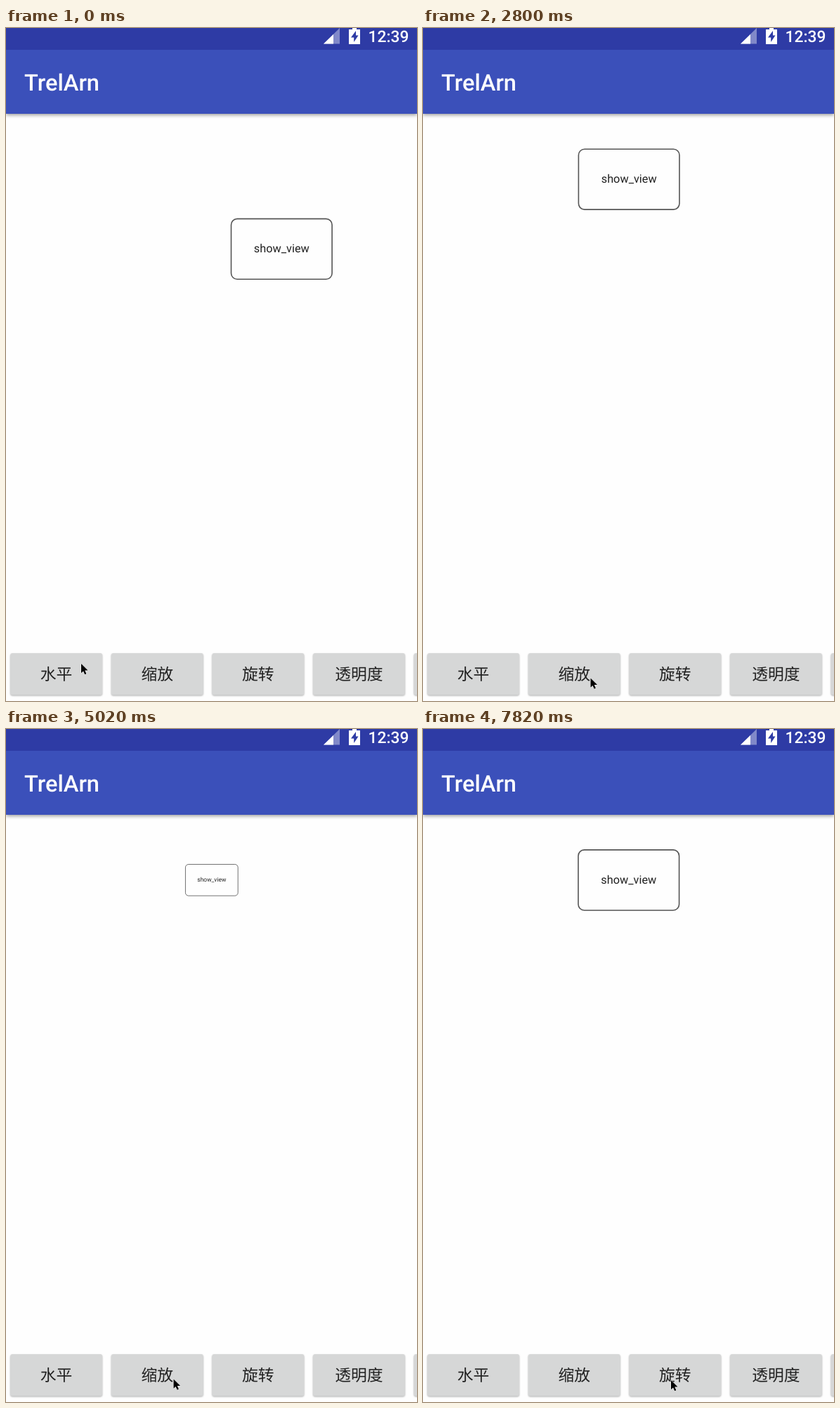
An HTML page that plays this animation: 585 px wide and 957 px high, repeating every 8 s.

```html
<!DOCTYPE html>
<html lang="zh">
<head>
<meta charset="utf-8">
<style>
  html, body { margin: 0; width: 100%; height: 100%; overflow: hidden; background: #fefefe; }
  svg { display: block; width: 585px; height: 957px; font-family: Roboto, sans-serif; text-rendering: geometricPrecision; }
  .bar { filter: drop-shadow(0 2px 2.5px rgba(0, 0, 0, .38)); }
  .label { font: 22.8px "Noto Sans CJK SC", "Noto Sans CJK", sans-serif; text-anchor: middle; fill: #212121; }
</style>
</head>
<body>
<svg viewBox="0 0 585 957">
  <rect class="bar" y="-10" width="585" height="132" fill="#3b50ba"/>
  <rect width="585" height="31" fill="#2e3ba5"/>
  <path d="M452 22.5L475 22.5V0Z" fill="#8189c9"/>
  <path d="M452 22.5H466V9Z" fill="#fff"/>
  <path d="M493 0H499V2H504V23H488V2H493Z" fill="#fff"/>
  <path d="M498 4L491 13.5H495.2V20L501.5 10.5H498Z" fill="#2e3ba5"/>
  <text x="515.5" y="20.3" font-size="22.8" font-weight="500" fill="#fff">12:39</text>
  <text x="26" y="89.3" font-size="32.6" font-weight="500" fill="#fff">TrelArn</text>
  <g id="buttons"></g>
  <g id="view">
    <rect x="-71.8" y="-42.9" width="143.6" height="85.8" rx="8.5" fill="#fefefe" stroke="#555" stroke-width="1.6"/>
    <text y="5" font-size="16.3" text-anchor="middle" fill="#212121">show_view</text>
  </g>
  <path id="cursor" d="M0 0V13.2L3 10.4L5.2 15.2L7.4 14.2L5.3 9.6H9.6Z" fill="#000" stroke="#fff" stroke-width="1" paint-order="stroke"/>
</svg>
<script>
const LOOP = 8000, STEP = 147.5, DURATION = 2000;
const $ = id => document.getElementById(id);

$("buttons").innerHTML = ["水平", "缩放", "旋转", "透明度", ""].map((name, i) => {
  const x = 6.3 + i * 143.6;
  return `<rect x="${x}" y="889" width="130.7" height="59.5" rx="3"/>
    <text class="label" x="${x + 65.3}" y="926.6">${name}</text>`;
}).join("");
const rects = [...document.querySelectorAll("#buttons rect")];

// [time, x, y] of the pointer tip
const path = [
  [0, 107, 904], [300, 100.5, 904.5], [1480, 100.5, 904.5], [1770, 170, 941],
  [1910, 214, 935], [2060, 238.5, 934], [2360, 238.5, 924.5], [6790, 238.5, 924.5],
  [7400, 353, 926], [LOOP, 353, 926]
];
// [button, time of the press]
const presses = [[0, 885], [1, 5755]];

const clamp = v => Math.min(1, Math.max(0, v));
const ease = (t, start) => (1 - Math.cos(Math.PI * clamp((t - start) / DURATION))) / 2;

function pointer(t) {
  const i = Math.max(1, path.findIndex(p => p[0] >= t));
  const [a, b] = [path[i - 1], path[i]];
  const u = clamp((t - a[0]) / (b[0] - a[0]));
  return [a[1] + (b[1] - a[1]) * u, a[2] + (b[2] - a[2]) * u];
}

function pressure(t, button) {
  const press = presses.find(p => p[0] === button);
  return press && t >= press[1] ? clamp(1 - (t - press[1]) / 400) : 0;
}

function draw(now) {
  // the screen refreshes in coarse steps
  const t = Math.floor((now % LOOP + 6) / STEP) * STEP;
  const shift = 110 * (ease(t, -1600) - ease(t, 880));
  const scale = 1 - 0.5 * (ease(t, 3275) - ease(t, 5815));
  $("view").setAttribute("transform", `translate(${292.8 + shift} ${214.8 + shift}) scale(${scale})`);
  $("cursor").setAttribute("transform", `translate(${pointer(t)})`);
  rects.forEach((rect, i) => {
    const p = pressure(t, i), shade = 214 - 10 * p;
    rect.style.fill = `rgb(${shade}, ${shade + 1}, ${shade + 1})`;
    rect.style.filter = `drop-shadow(0 ${1.6 + 1.5 * p}px ${1.3 + p}px rgba(0, 0, 0, .32))`;
  });
  requestAnimationFrame(draw);
}
requestAnimationFrame(draw);
</script>
</body>
</html>
```
